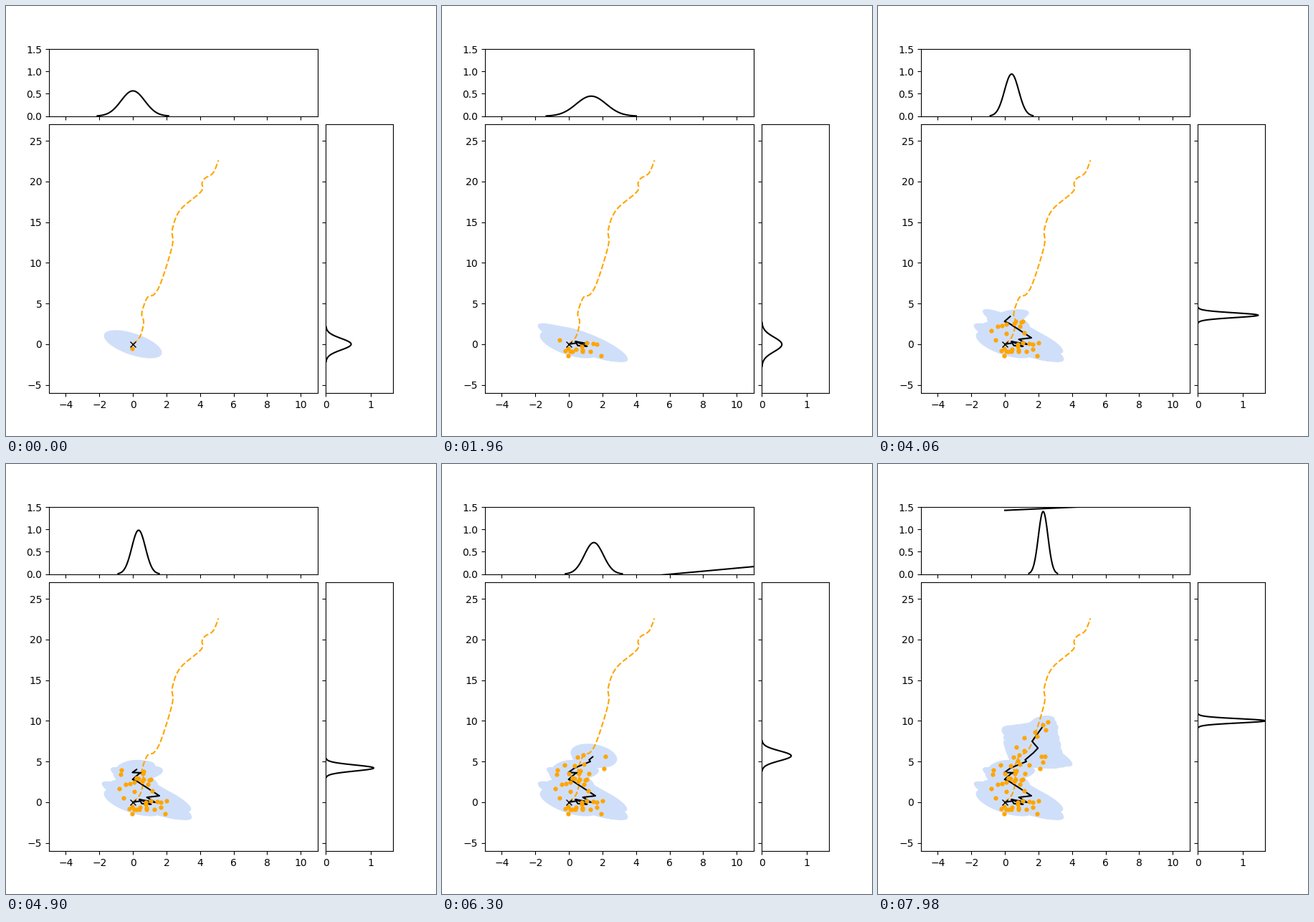
A matplotlib script that plays this animation: 600 px wide and 600 px high, repeating every 8 s.

```python
import numpy as np
import matplotlib.pyplot as plt
from matplotlib.animation import FuncAnimation

STEP = 140          # ms per filter step
INTERVAL = 40       # ms per drawn frame
LOOP = 8000
STEPS = LOOP // STEP + 1
BAND = 2.447        # 95 % contour of a 2-D normal


def ease_keys(keys):
    """Linear values at every step from {step: values}."""
    return np.column_stack([np.interp(np.arange(STEPS), list(keys), col)
                            for col in zip(*keys.values())])


def smooth(points, n=8):
    """Catmull-Rom curve through a few points."""
    p = np.array(points, float)
    p = np.vstack([p[0], p, p[-1]])
    t = np.linspace(0, 1, n, endpoint=False)[:, None]
    parts = [b + .5 * t * (c - a + t * (2 * a - 5 * b + 4 * c - d
                                        + t * (3 * (b - c) + d - a)))
             for a, b, c, d in zip(p, p[1:], p[2:], p[3:])]
    return np.vstack(parts + [p[-1:]])


def bell(mu, s):
    v = np.linspace(mu - 3 * s, mu + 3 * s, 100)
    return v, np.exp(-.5 * ((v - mu) / s) ** 2) / (s * np.sqrt(2 * np.pi))


def ellipse(mu, s):
    t = np.linspace(0, 2 * np.pi, 90)
    sx, sy, rho = s
    return (mu[0] + BAND * sx * np.cos(t),
            mu[1] + BAND * sy * np.cos(t - np.arccos(rho)))


truth = smooth([
    (0, 0), (.43, .96), (.64, 2.7), (.53, 3.8), (.85, 5.7), (1.28, 6.15),
    (1.7, 7.75), (2.35, 12.15), (2.35, 14.1), (2.82, 16.5), (4.06, 18.75),
    (4.12, 19.8), (4.3, 20.4), (4.78, 21.05), (5.1, 22.6)])

# turning points of the estimate
mean = ease_keys({
    0: (0, 0), 2: (.43, .14), 4: (.54, -.18), 7: (1.08, -.26),
    11: (.38, .34), 14: (1.33, -.03), 16: (.83, .6), 18: (1.58, .78),
    20: (.3, 2.5), 24: (-.02, 2.8), 29: (.4, 3.56), 30: (.72, 3.6),
    32: (-.03, 3.65), 35: (.34, 4.2), 40: (1.28, 5), 41: (1.205, 5.2),
    48: (1.7, 6.07), 50: (1.97, 6.65), 51: (1.62, 7.48), 55: (2.22, 9.2),
    57: (2.28, 10)})

# sigma x, sigma y, correlation
spread = ease_keys({
    0: (.707, .707, -.6), 2: (.61, .51, -.75), 7: (.79, .773, -.9),
    10: (.92, .92, -.88), 16: (.88, .88, -.8), 20: (.665, .74, -.85),
    22: (.39, .3, 0), 29: (.424, .296, .4), 33: (.48, .56, .1),
    36: (.37, .28, .4), 41: (.346, .352, .2), 50: (.84, .93, -.87),
    54: (.45, .45, -.2), 57: (.285, .265, .3)})

# measurements scatter around the estimate
k2 = np.arange(STEPS) ** 2
seen = mean + np.column_stack([-.06 + .9 * np.sin(1.7 * k2),
                               -.53 + .7 * np.sin(k2)])

fig = plt.figure(figsize=(6, 6), dpi=100)
grid = fig.add_gridspec(2, 2, width_ratios=(4, 1), height_ratios=(1, 4),
                        left=.1, right=.9, bottom=.1, top=.9,
                        wspace=.05, hspace=.05)
ax = fig.add_subplot(grid[1, 0])
ax_x = fig.add_subplot(grid[0, 0], sharex=ax)
ax_y = fig.add_subplot(grid[1, 1], sharey=ax)
ax.set(xlim=(-5, 11), ylim=(-6, 27),
       xticks=range(-4, 11, 2), yticks=range(-5, 26, 5))
ax_x.set(ylim=(0, 1.5), yticks=(0, .5, 1, 1.5))
ax_y.set(xlim=(0, 1.5), xticks=(0, 1))
ax_x.tick_params(labelbottom=False)
ax_y.tick_params(labelleft=False)

regions = [ax.fill(*ellipse(mu, s), color="#d0dff9", lw=0, zorder=1)[0]
           for mu, s in zip(mean, spread)]
ax.plot(*truth.T, "--", color="orange", zorder=2)
track, = ax.plot([], [], color="black", zorder=3)
dots, = ax.plot([], [], ".", color="orange", mew=1.5, zorder=4)
ax.plot(0, 0, "x", color="black", zorder=5)
pdf_x, = ax_x.plot([], [], color="black")
ramp, = ax_x.plot([], [], color="black")
pdf_y, = ax_y.plot([], [], color="black")


def update(frame):
    k = min(int((frame + .5) * INTERVAL) // STEP, STEPS - 1)
    for i, region in enumerate(regions):
        region.set_visible(i <= k)
    track.set_data(*mean[:k].T)
    dots.set_data(*seen[:k + 1].T)
    x, px = bell(mean[k, 0], spread[k, 0])
    y, py = bell(mean[k, 1], spread[k, 1])
    pdf_x.set_data(x, px)
    ramp.set_data(np.arange(100), x)    # sample values against their index
    pdf_y.set_data(py, y)
    return [*regions, track, dots, pdf_x, ramp, pdf_y]


anim = FuncAnimation(fig, update, frames=LOOP // INTERVAL, interval=INTERVAL,
                     init_func=lambda: update(0), repeat=True, repeat_delay=0)
plt.show()
```
